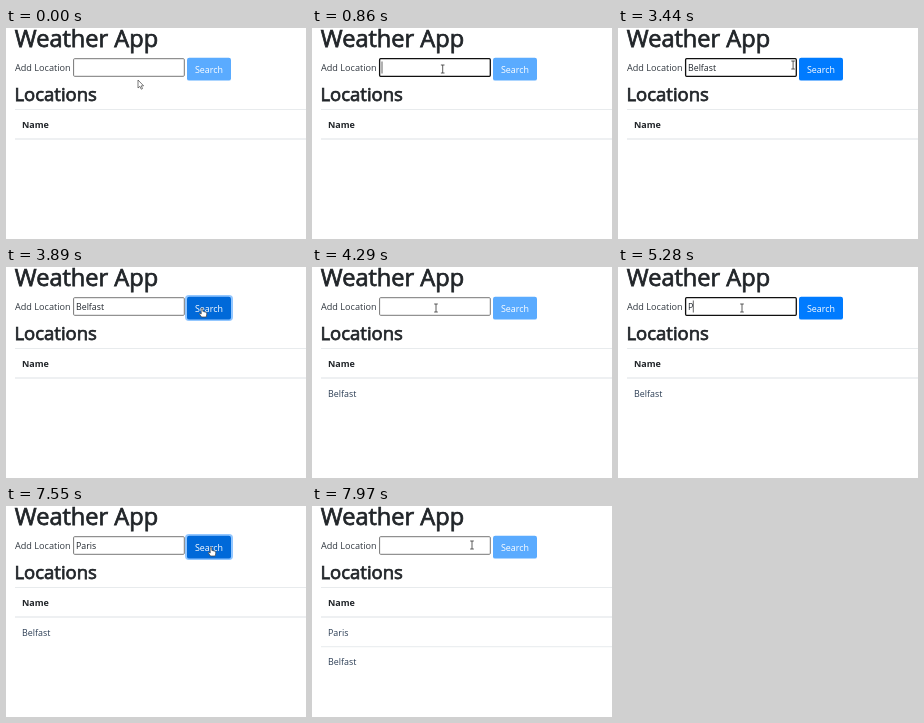
An HTML page for the animation above (8 s loop, 300x211 px).

```html
<!DOCTYPE html>
<html lang="en">
<head>
<meta charset="utf-8">
<title>Weather App</title>
<style>
  html, body { margin: 0; width: 100%; height: 100%; overflow: hidden; background: #fff; }
  svg { display: block; width: 300px; height: 211px; }
  text { font: 8.9px "Open Sans", "Noto Sans", sans-serif; fill: #2b3d54; white-space: pre; }
  .title { fill: #212529; stroke: #212529; stroke-width: .75px; }
  .h1 { font-size: 23.6px; }
  .h2 { font-size: 18.5px; }
  .label { font-size: 9.15px; fill: #333a42; }
  .head { font-size: 9px; font-weight: 700; fill: #212529; }
  .rule { stroke: #dee2e6; stroke-width: .7; }
  .thick { stroke-width: 1.2; }
  #field { fill: #fff; stroke: #777; stroke-width: 1; }
  #field.focus { stroke: #101010; stroke-width: 1.3; }
  #typed { font-size: 8.8px; fill: #20262d; }
  #caret { stroke: #222; stroke-width: .7; }
  #button { fill: #007bff; }
  #button.off { fill: #5aabff; }
  #button.hover { fill: #0069d9; }
  #ring { fill: #93c7ff; }
  #search { fill: #fff; }
  .pointer { fill: #fff; stroke: #444; stroke-width: .7; stroke-linejoin: round; }
  #beam { fill: none; stroke: #333; stroke-width: .8; }
</style>
</head>
<body>
<svg viewBox="0 0 300 211">
  <text class="title h1" x="8.8" y="19.3">Weather App</text>
  <text class="label" x="9" y="43.4">Add Location</text>

  <rect id="field" x="67.6" y="30.7" width="110.7" height="17.6" rx="1"/>
  <text id="typed" x="70" y="43.4"></text>
  <path id="caret" d="M0 33.5V45.5"/>

  <rect id="ring" x="179" y="28" width="48" height="26" rx="4"/>
  <rect id="button" x="181" y="29.7" width="44" height="22.9" rx="2.2"/>
  <text id="search" x="189" y="44.8">Search</text>

  <text class="title h2" x="8.5" y="72.5">Locations</text>
  <path class="rule" d="M9 81.5H300"/>
  <text class="head" x="16" y="100.2">Name</text>
  <path class="rule thick" d="M9 111H300"/>
  <text id="row1" x="16" y="130"></text>
  <path class="rule" id="rule2" d="M9 140.7H300"/>
  <text id="row2" x="16" y="159.4"></text>

  <g id="cursor">
    <path id="arrow" class="pointer" d="M0 0V8L1.9 6.3 3.2 9.2 4.5 8.6 3.3 5.8H5.6Z"/>
    <path id="beam" d="M-1.8-4H1.8M0-4V4M-1.8 4H1.8"/>
    <path id="hand" class="pointer" d="M-.8 5V.7Q0-.4.8.7V3.4L4 4.2Q5 4.6 4.8 6L4.2 9H-.4L-2.8 5.8Q-2.4 4.6-.8 6Z"/>
  </g>
</svg>
<script>
const LOOP = 8000, GLIDE = 280, BLINK = 560;
const $ = id => document.getElementById(id);
const show = (id, on) => { $(id).style.display = on ? "" : "none"; };

// Each search: click the field, type at an even pace, press the button, get a reply
const searches = [
  { word: "Belfast", focus: 350, type: 1270, pace: 182, press: 3710, reply: 4040 },
  { word: "Paris", focus: 4380, type: 5280, pace: 210, press: 7550, reply: 7720 }
];

// Where the pointer glides to, and when it arrives
const stops = [
  { at: 0, x: 132, y: 52 },
  { at: 350, x: 130.7, y: 41 },
  { at: 3440, x: 175, y: 37 },
  { at: 3710, x: 196, y: 41 },
  { at: 4290, x: 124, y: 41 },
  { at: 6960, x: 186, y: 53 },
  { at: 7210, x: 224, y: 54 },
  { at: 7460, x: 205, y: 41 },
  { at: 7970, x: 160, y: 39 }
];

function pointer(t) {
  let { x, y } = stops[0];
  for (const stop of stops.slice(1)) {
    const p = Math.min(1, Math.max(0, (t - stop.at + GLIDE) / GLIDE));
    const eased = p * p * (3 - 2 * p);
    x += (stop.x - x) * eased;
    y += (stop.y - y) * eased;
  }
  return { x, y };
}

function draw(t) {
  const { word, focus, type, pace, press, reply } = searches.find(s => t < s.reply) || searches[1];
  const waiting = t < reply;
  const count = waiting ? Math.min(word.length, Math.max(0, Math.floor((t - type) / pace) + 1)) : 0;
  const focused = t >= focus && t < press;
  const lastEdit = count ? type + (count - 1) * pace : focus;

  $("typed").textContent = word.slice(0, count);
  $("field").classList.toggle("focus", focused);
  show("caret", focused && (t - lastEdit) % (2 * BLINK) < BLINK);
  const end = count ? $("typed").getComputedTextLength() : 0;
  $("caret").setAttribute("transform", `translate(${70 + end} 0)`);

  const { x, y } = pointer(t);
  const overField = x > 67 && x < 179 && y > 30 && y < 49;
  const overButton = count > 0 && x > 181 && x < 225 && y > 29 && y < 52;
  $("button").setAttribute("class", !count ? "off" : overButton ? "hover" : "");
  show("ring", waiting && t >= press);

  const found = searches.filter(s => t >= s.reply).map(s => s.word).reverse();
  $("row1").textContent = found[0] || "";
  $("row2").textContent = found[1] || "";
  show("rule2", found.length > 1);

  $("cursor").setAttribute("transform", `translate(${x} ${y})`);
  show("beam", overField);
  show("hand", overButton);
  show("arrow", !overField && !overButton);
}

const start = performance.now();
function tick() {
  draw((performance.now() - start) % LOOP);
  requestAnimationFrame(tick);
}
tick();
</script>
</body>
</html>
```
